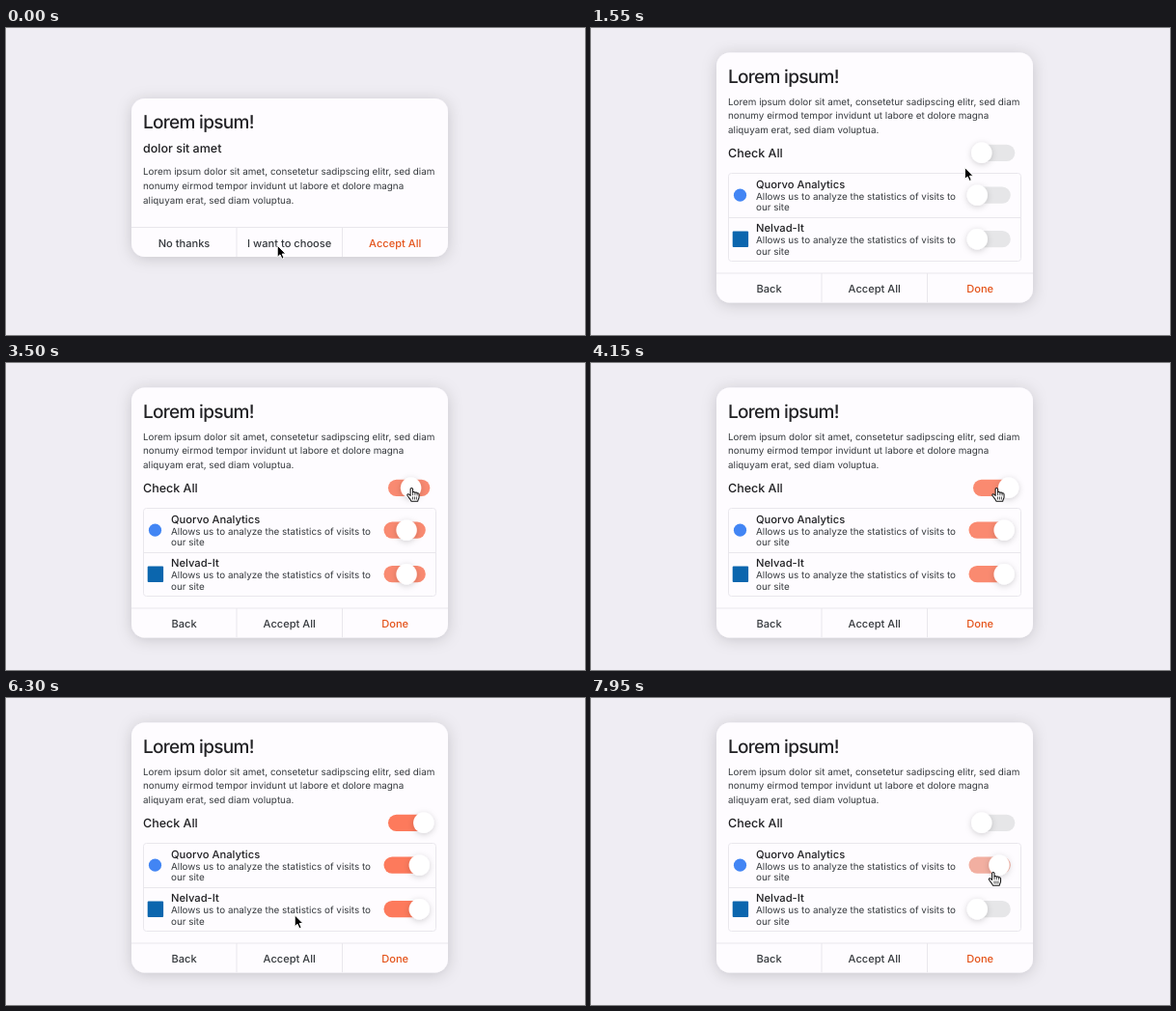
An HTML page that plays this animation: 600x318 px, repeating every 8000 ms.

```html
<!DOCTYPE html>
<html lang="en">
<head>
<meta charset="utf-8">
<title>Consent dialog</title>
<style>
html, body { margin: 0; width: 100%; height: 100%; overflow: hidden; background: #efedf3; }
svg { display: block; width: 600px; height: 318px; }
text { font-family: Inter, "Open Sans", sans-serif; font-weight: 450; fill: #35393d; text-rendering: geometricPrecision; }
.title { font-size: 19px; font-weight: 500; letter-spacing: -.7px; fill: #232326; }
.sub { font-size: 12.5px; fill: #1f1f22; }
.body { font-size: 9.86px; font-weight: 400; }
.name { font-size: 11.2px; fill: #1f1f22; }
.btn { font-size: 11.1px; text-anchor: middle; }
.accent { fill: #e4541b; }
.line { fill: none; stroke: #e9e7ec; }
</style>
</head>
<body>
<svg viewBox="0 0 600 318">
  <defs>
    <filter id="cardShadow" x="-20%" y="-30%" width="140%" height="160%">
      <feDropShadow dx="0" dy="2" stdDeviation="7.5" flood-color="#000" flood-opacity=".17"/>
    </filter>
    <filter id="knobShadow" x="-80%" y="-80%" width="260%" height="260%">
      <feDropShadow dx="0" dy="1.5" stdDeviation="3" flood-color="#000" flood-opacity=".18"/>
    </filter>
    <clipPath id="clip"><rect id="clipRect" x="130" width="328" rx="14"/></clipPath>
  </defs>
  <rect width="600" height="318" fill="#efedf3"/>
  <rect id="card" x="130" width="328" rx="14" fill="#fefcff" filter="url(#cardShadow)"/>
  <g clip-path="url(#clip)">
    <!-- content is placed relative to the card's top edge -->
    <g id="top">
      <text class="title" x="142" y="31.2">Lorem ipsum!</text>
      <g id="intro">
        <text class="sub" x="142" y="56.3">dolor sit amet</text>
        <g class="lorem" transform="translate(142 79)"></g>
      </g>
      <g id="options">
        <g class="lorem" transform="translate(142 54.2)"></g>
        <text class="sub" x="142" y="108.2">Check All</text>
        <rect class="line" x="142.5" y="125" width="303" height="91" rx="3"/>
        <path class="line" d="M142.5 171H445.5"/>
        <circle cx="154.5" cy="147.7" r="6.6" fill="#4285f4"/>
        <rect x="146.7" y="185" width="16.4" height="16.4" rx="1" fill="#0b66ae"/>
        <g id="rows"></g>
        <g id="switches"></g>
      </g>
    </g>
    <!-- and the button bar relative to its bottom edge -->
    <g id="bar">
      <rect id="press" y="-30.5" width="109.5" height="31" fill="#d4d3d5"/>
      <path class="line" d="M130 -30.5H458M239 -30.5V0M348.5 -30.5V0"/>
      <g id="introBtns"></g>
      <g id="optionBtns"></g>
    </g>
  </g>
  <g id="cursor">
    <path id="arrow" transform="translate(-.8 -.8)" d="M0 0V12.2L2.8 9.6L4.8 14L6.9 13.1L5 8.8H8.7Z" fill="#000" stroke="#fff" stroke-width="1" stroke-linejoin="round"/>
    <g id="hand" transform="translate(.6 -.6) scale(.93)" stroke="#111" stroke-linejoin="round" stroke-linecap="round">
      <path d="M-1.6 8.6V1.4C-1.6 -.4 1 -.4 1 1.4V5C1.4 4 3.4 4.1 3.5 5.4C4.1 4.5 5.8 4.8 5.9 6.1C6.7 5.4 8 5.8 8 7.2V10C8 12 6.8 12.6 6.6 14.8H-.7C-1 12.8 -3.6 10.8 -4.9 8.8C-5.8 7.3 -4.3 6.3 -3.1 7.2Z" fill="#fff" stroke-width="1.1"/>
      <path d="M1 5V8M3.5 5.6V8M5.9 6.3V8.2M1 10.2V12.6M3.1 10.2V12.6M5.2 10.2V12.6" fill="none" stroke-width=".8"/>
    </g>
  </g>
</svg>
<script>
const LOOP = 8000;
const $ = id => document.getElementById(id);
const set = (el, attrs) => { for (const k in attrs) el.setAttribute(k, attrs[k]); };
const clamp = v => Math.min(1, Math.max(0, v));
const smooth = v => { v = clamp(v); return v * v * (3 - 2 * v); };
const cubic = v => { v = clamp(v); return v < .5 ? 4 * v ** 3 : 1 - 4 * (1 - v) ** 3; };
const mix = (a, b, k) => a + (b - a) * k;
const text = (cls, x, y, s) => `<text class="${cls}" x="${x}" y="${y}">${s}</text>`;

const lorem = [
  "Lorem ipsum dolor sit amet, consetetur sadipscing elitr, sed diam",
  "nonumy eirmod tempor invidunt ut labore et dolore magna",
  "aliquyam erat, sed diam voluptua."
];
document.querySelectorAll(".lorem").forEach(g => {
  g.innerHTML = lorem.map((s, i) => text("body", 0, i * 14.8, s)).join("");
});

$("rows").innerHTML = ["Quorvo Analytics", "Nelvad-It"].map((name, i) => {
  const y = 140.6 + i * 45.3;
  return text("name", 171, y, name) +
    text("body", 171, y + 11.9, "Allows us to analyze the statistics of visits to") +
    text("body", 171, y + 23.2, "our site");
}).join("");

const buttons = labels => labels.map((s, i) =>
  text(i == 2 ? "btn accent" : "btn", [184.5, 293.7, 403.2][i], -10.5, s)).join("");
$("introBtns").innerHTML = buttons(["No thanks", "I want to choose", "Accept All"]);
$("optionBtns").innerHTML = buttons(["Back", "Accept All", "Done"]);

// Each switch lists the times of its flips, starting from off
const switches = [
  { x: 396, y: 103.8, flips: [2800, 3400, 3950, 7150] },
  { x: 391.5, y: 147.6, flips: [2270, 3400, 3950, 7150, 7800] },
  { x: 391.5, y: 193.2, flips: [2800, 3400, 3950, 7150] }
];
$("switches").innerHTML = switches.map(s =>
  `<rect x="${s.x}" y="${s.y - 8.6}" width="43.3" height="17.2" rx="8.6"/>
   <circle cy="${s.y}" r="10.7" fill="#fff" filter="url(#knobShadow)"/>`).join("");
const tracks = $("switches").querySelectorAll("rect");
const knobs = $("switches").querySelectorAll("circle");

// Cursor stops: time, x, y
const stops = [
  [0, 282, 226], [1150, 282, 226], [1350, 388, 145], [1530, 388, 145],
  [1900, 405, 172], [2350, 405, 172], [2650, 408.5, 221], [3000, 408.5, 221],
  [3350, 420, 130], [4250, 420, 130], [4700, 394, 270], [5080, 262, 286],
  [5350, 202.5, 278.5], [5620, 202.5, 278.5], [5920, 300, 225.5], [6500, 300, 225.5],
  [7050, 420, 130], [7380, 420, 130], [7720, 416.5, 181], [LOOP, 416.5, 181]
];
// Pressed buttons: from, to, column
const presses = [[500, 620, 1], [5380, 5570, 0], [5920, 6020, 1]];

function cursorAt(t) {
  const i = stops.findIndex(s => s[0] > t);
  const a = stops[i - 1], b = stops[i];
  const k = smooth((t - a[0]) / (b[0] - a[0]));
  return [mix(a[1], b[1], k), mix(a[2], b[2], k)];
}

function drawSwitch(s, i, t) {
  const past = s.flips.filter(f => f <= t);
  const on = past.length % 2;
  const dt = past.length ? t - past[past.length - 1] : LOOP;
  const dir = v => on ? v : 1 - v;
  const move = dir(smooth(dt / 210)), tint = dir(cubic(dt / 300));
  const rgb = [[230, 253], [230, 122], [232, 92]].map(([a, b]) => Math.round(mix(a, b, tint)));
  set(tracks[i], { fill: `rgb(${rgb})` });
  set(knobs[i], { cx: s.x + 8.8 + 28 * move });
}

function render(t) {
  const open = smooth((t - 600) / 300) - smooth((t - 5550) / 280) + smooth((t - 6000) / 270);
  const half = mix(82, 129.5, open), top = 155 - half, bottom = 155 + half;
  for (const id of ["card", "clipRect"]) set($(id), { y: top, height: half * 2 });
  set($("top"), { transform: `translate(0 ${top})` });
  set($("bar"), { transform: `translate(0 ${bottom})` });
  for (const id of ["intro", "introBtns"]) set($(id), { opacity: 1 - open });
  for (const id of ["options", "optionBtns"]) set($(id), { opacity: open });

  const press = presses.find(p => t >= p[0] && t < p[1]);
  set($("press"), { x: press ? 130 + press[2] * 109.3 : 130, opacity: press ? 1 : 0 });
  switches.forEach((s, i) => drawSwitch(s, i, t));

  const [x, y] = cursorAt(t);
  const over = open > .9 && switches.some(s =>
    x > s.x - 3 && x < s.x + 47 && Math.abs(y - top - s.y) < 11);
  set($("cursor"), { transform: `translate(${x} ${y})` });
  set($("hand"), { visibility: over ? "visible" : "hidden" });
  set($("arrow"), { visibility: over ? "hidden" : "visible" });
}

function tick() {
  render(performance.now() % LOOP);
  requestAnimationFrame(tick);
}
tick();
</script>
</body>
</html>
```
